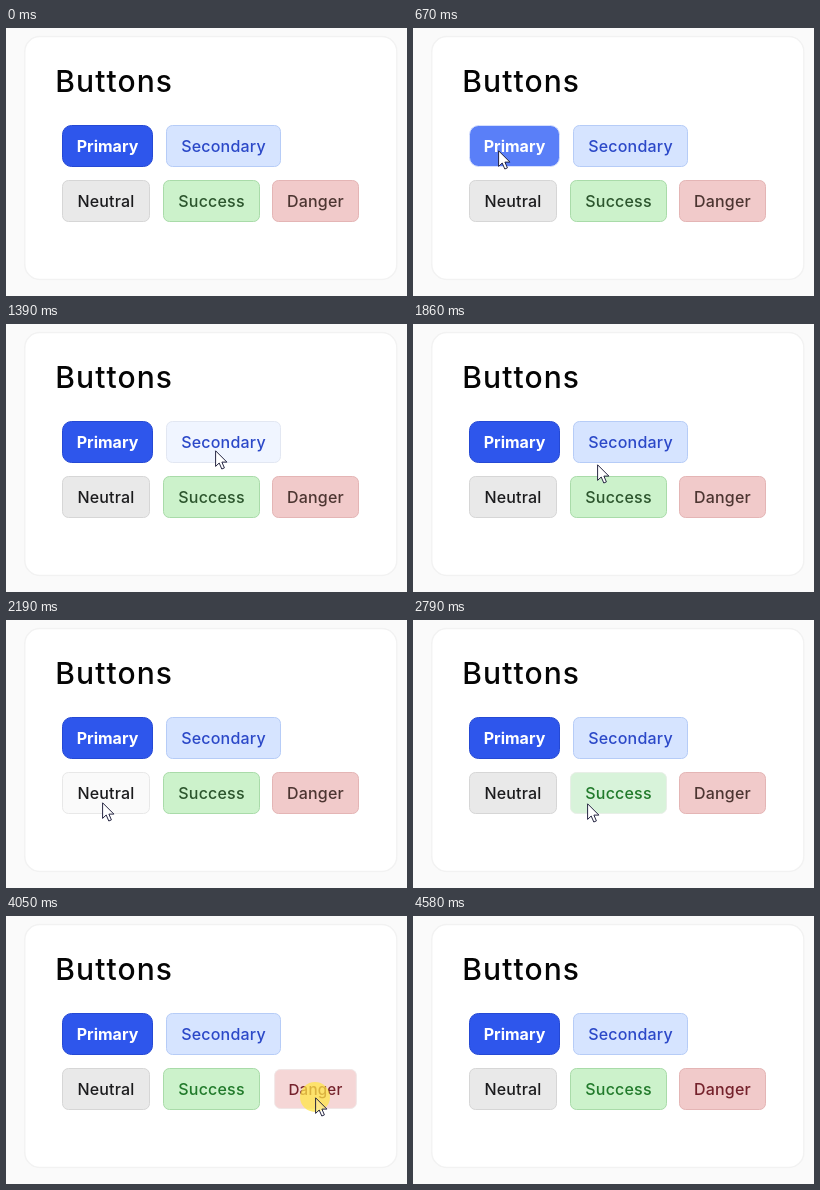
An HTML page that plays this animation: 401 px wide and 268 px high, repeating every 5240 ms.

```html
<!DOCTYPE html>
<html lang="en">
<head>
<meta charset="utf-8">
<title>Buttons</title>
<style>
  html, body { margin: 0; width: 100%; height: 100%; overflow: hidden; background: #fafafa; }
  svg { display: block; width: 401px; height: 268px; }
  text { font-family: Inter, "Liberation Sans", sans-serif; }
</style>
</head>
<body>
<svg viewBox="0 0 401 268">
  <rect width="401" height="268" fill="#fafafa"/>
  <rect x="18.8" y="8.5" width="372" height="243" rx="15" fill="#fff" stroke="#f2f2f2" stroke-width="1.4"/>
  <text x="49.3" y="64" font-size="30" font-weight="550" letter-spacing="1.1" fill="#050505">Buttons</text>
  <g id="buttons"></g>
  <circle id="click" r="15" fill="#ffe546" fill-opacity=".74"/>
  <path id="cursor" d="M.6 .8V16.4L4.2 13L6.8 19L9.4 17.9L6.9 12.1H11.9Z"
        fill="#fff" stroke="#1b1b38" stroke-width=".95" stroke-linejoin="round"/>
</svg>
<script>
const LOOP = 5240;
const HEIGHT = 42;

// idle and hover are [fill, border]; ink changes to "late" after the given time
const buttons = [
  { label: "Primary", x: 56, y: 97, w: 91, r: 9, ink: "#ffffff", weight: 650, spacing: 0,
    idle: ["#2e56ec", "#2549d4"], hover: ["#5a7ff8", "#d5dffd"] },
  { label: "Secondary", x: 160, y: 97, w: 115, r: 6, ink: "#2b48c8",
    idle: ["#d6e4ff", "#b6ccf7"], hover: ["#f0f5ff", "#e2e7f2"] },
  { label: "Neutral", x: 56, y: 152, w: 88, r: 6, ink: "#1b1b1d",
    idle: ["#e9e9e9", "#d6d6d6"], hover: ["#fafafa", "#e8e8e8"] },
  { label: "Success", x: 157, y: 152, w: 97, r: 6, ink: "#2c552d", late: "#217a2b", lateAt: 2750,
    idle: ["#ccf2cb", "#a9dba9"], hover: ["#d8f3da", "#e8efe7"] },
  { label: "Danger", x: 266, y: 152, w: 87, r: 6, ink: "#4c3531", late: "#74212b", lateAt: 3500,
    idle: ["#f1caca", "#e4b5b5"], hover: ["#f5d6d6", "#f0e6e6"] }
];

const easeOut = u => Math.sin(u * Math.PI / 2);
const easeIn = u => u ** 1.4;
const smooth = u => u * u * (3 - 2 * u);
const linear = u => u;

// Each move advances in even steps; path entries are [step, x, y]
const moves = [
  { from: 180, to: 670, steps: 7, ease: easeOut, path: [[0, 236, 242], [7, 85, 122]] },
  { from: 1060, to: 1460, steps: 6, press: true, ease: smooth, path: [[2, 85, 122], [5, 209, 126]] },
  { from: 1590, to: 2190, steps: 9, press: true, ease: easeIn, path: [[2, 209, 126], [7, 118, 178], [9, 96, 182]] },
  { from: 2460, to: 2990, steps: 8, press: true, ease: smooth, path: [[2, 96, 182], [7, 216, 183], [8, 218, 183]] },
  { from: 3190, to: 3780, steps: 9, press: true, ease: easeIn, path: [[2, 218, 183], [7, 279, 186], [9, 309, 181]] },
  { from: 4050, to: 4580, steps: 8, press: true, leaves: true, ease: easeIn, path: [[2, 309, 181], [7, 373, 252]] }
];

const byId = id => document.getElementById(id);

function add(parent, tag, attrs) {
  const el = document.createElementNS("http://www.w3.org/2000/svg", tag);
  set(el, attrs);
  return parent.appendChild(el);
}

function set(el, attrs) {
  for (const key in attrs) el.setAttribute(key, attrs[key]);
}

for (const b of buttons) {
  b.group = add(byId("buttons"), "g", {});
  b.box = add(b.group, "rect", {
    x: b.x + .5, y: b.y + .5, width: b.w - 1, height: HEIGHT - 1, rx: b.r
  });
  b.text = add(b.group, "text", {
    x: b.x + b.w / 2, y: b.y + 26.8, "font-size": 16, "text-anchor": "middle",
    "font-weight": b.weight ?? 550, "letter-spacing": b.spacing ?? .2
  });
  b.text.textContent = b.label;
}

function along(path, step, ease) {
  let [s0, x0, y0] = path[0];
  if (step <= s0) return [x0, y0];
  for (let i = 1; i < path.length; i++) {
    const [s1, x1, y1] = path[i];
    if (step <= s1) {
      const p = (i === 1 ? ease : linear)((step - s0) / (s1 - s0));
      return [x0 + (x1 - x0) * p, y0 + (y1 - y0) * p];
    }
    [s0, x0, y0] = path[i];
  }
  return [x0, y0];
}

function pointerAt(t) {
  const move = moves.filter(m => m.from <= t).pop();
  if (!move) return null;
  const progress = (t - move.from) / (move.to - move.from);
  const step = Math.min(move.steps, Math.floor(progress * move.steps + .1));
  if (move.leaves && step === move.steps) return null;
  const [x, y] = along(move.path, step, move.ease);
  return { x: Math.round(x), y: Math.round(y), pressed: Boolean(move.press) && step < 2 };
}

function isOver(b, p) {
  return p && p.x >= b.x && p.x < b.x + b.w && p.y >= b.y && p.y < b.y + HEIGHT;
}

function draw(t) {
  const pointer = pointerAt(t);
  const pressed = Boolean(pointer && pointer.pressed);

  for (const b of buttons) {
    const over = isOver(b, pointer);
    const [fill, stroke] = over ? b.hover : b.idle;
    const scale = over && pressed ? .95 : 1;
    const cx = b.x + b.w / 2, cy = b.y + HEIGHT / 2;
    set(b.box, { fill, stroke });
    set(b.text, { fill: t >= b.lateAt ? b.late : b.ink });
    set(b.group, { transform: `translate(${cx} ${cy}) scale(${scale}) translate(${-cx} ${-cy})` });
  }

  // The click highlight shows through the pointer
  const place = pointer ? `translate(${pointer.x} ${pointer.y})` : "";
  set(byId("cursor"), {
    transform: place, visibility: pointer ? "visible" : "hidden", "fill-opacity": pressed ? .2 : 1
  });
  set(byId("click"), { transform: place, visibility: pressed ? "visible" : "hidden" });
}

const start = performance.now();

function tick() {
  draw((performance.now() - start) % LOOP);
  requestAnimationFrame(tick);
}

tick();
</script>
</body>
</html>
```
